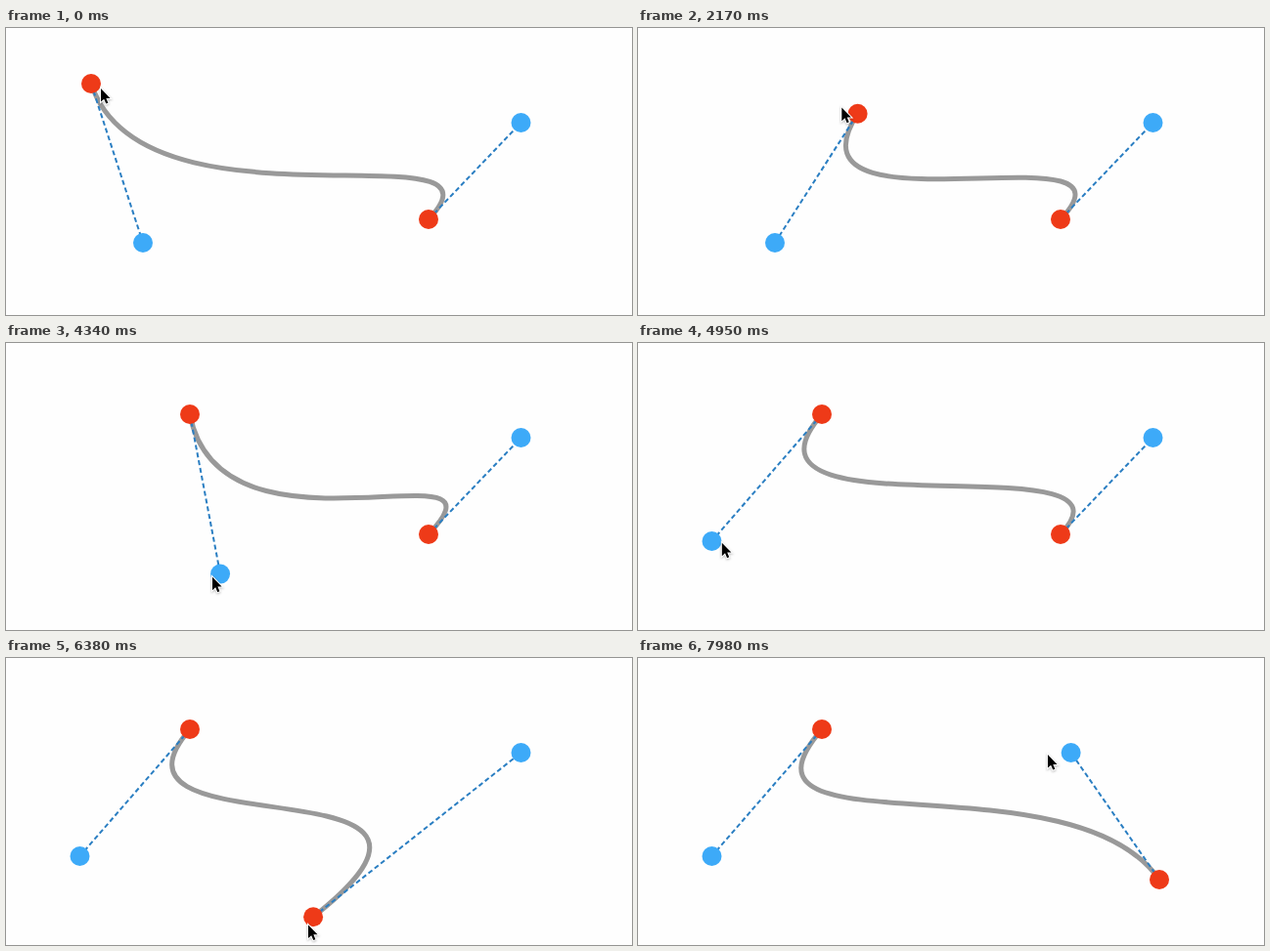
Write an HTML page that moves like this. It is 640 by 294 pixels and loops after 8 s.

```html
<!DOCTYPE html>
<html lang="en">
<head>
<meta charset="utf-8">
<title>Bezier handles</title>
<style>
  html, body { margin: 0; width: 100%; height: 100%; overflow: hidden; background: #fefefe; }
  svg { display: block; width: 100%; height: 100%; }
  #curve { fill: none; stroke: #999; stroke-width: 5; }
  .arm { stroke: #2a7ec2; stroke-width: 2; stroke-dasharray: 5 3; }
  .end { fill: #ee3a18; }
  .handle { fill: #3daaf8; }
  #cursor { fill: #000; stroke: #fff; stroke-width: 2; paint-order: stroke; filter: drop-shadow(0 1px .8px #0004); }
</style>
</head>
<body>
<svg viewBox="0 0 640 294">
  <path id="curve"/>
  <line class="arm"/>
  <line class="arm"/>
  <circle class="end" r="10"/>
  <circle class="handle" r="10"/>
  <circle class="handle" r="10"/>
  <circle class="end" r="10"/>
  <path id="cursor" d="M0 0V13.6L3.2 10.7 5.3 15.6 7.4 14.7 5.4 9.9H9.6Z"/>
</svg>
<script>
const LOOP = 8000;
const LEAD = 30; // the pointer runs this far ahead of the dragged dot

const homes = [[87, 57], [140, 220], [526.5, 97], [432, 196]];
const pointerHome = [97, 62];

// An eased leg to (x, y); bow bends its middle downwards.
const leg = (t0, t1, x, y, bow = 0) => ({ t0, t1, to: [x, y], bow });

// In turn, the pointer reaches for each dot, holds it at grip and drags it.
const drags = [
  { dot: 0, grip: [-6, -2], reach: [60, 360],
    legs: [leg(810, 1910, 295, 116), leg(1910, 2340, 188, 73)] },
  { dot: 1, grip: [5, 2], reach: [2520, 3240],
    legs: [leg(3420, 4090, 283, 223), leg(4090, 4770, 75.5, 203, 24)] },
  { dot: 3, grip: [-9.5, 9], reach: [4950, 5370], bow: -7,
    legs: [leg(5740, 6350, 312.5, 265.5, 9), leg(6350, 6970, 533, 227)] },
  { dot: 2, grip: [-6, 2], reach: [7210, 7440],
    legs: [leg(7770, 8190, 360, 97)] }
];

function travel(p, legs, t) {
  for (const { t0, t1, to, bow } of legs) {
    const u = Math.min(1, Math.max(0, (t - t0) / (t1 - t0)));
    const s = u * u * (3 - 2 * u);
    p = [p[0] + (to[0] - p[0]) * s,
         p[1] + (to[1] - p[1]) * s + bow * Math.sin(Math.PI * s)];
  }
  return p;
}

const held = ({ dot, grip, legs }, t) =>
  travel(homes[dot], legs, t).map((v, i) => v + grip[i]);

function pointer(t) {
  let p = pointerHome;
  for (const d of drags) {
    if (t < d.reach[0]) break;
    p = t < d.reach[1]
      ? travel(p, [leg(...d.reach, ...held(d, 0), d.bow)], t)
      : held(d, t);
  }
  return p;
}

const curve = document.getElementById('curve');
const cursor = document.getElementById('cursor');
const arms = document.querySelectorAll('.arm');
const dots = document.querySelectorAll('circle');

function set(el, attrs) {
  for (const name in attrs) el.setAttribute(name, attrs[name]);
}

function draw(t) {
  const pts = [...homes];
  for (const { dot, legs } of drags) pts[dot] = travel(homes[dot], legs, t);

  const [a, b, c, d] = pts;
  set(curve, { d: `M${a}C${b} ${c} ${d}` });
  [[a, b], [d, c]].forEach(([p, q], i) =>
    set(arms[i], { x1: p[0], y1: p[1], x2: q[0], y2: q[1] }));
  pts.forEach(([cx, cy], i) => set(dots[i], { cx, cy }));
  set(cursor, { transform: `translate(${pointer(t + LEAD)})` });
}

const start = performance.now();
function frame() {
  draw((performance.now() - start) % LOOP);
  requestAnimationFrame(frame);
}
frame();
</script>
</body>
</html>
```
